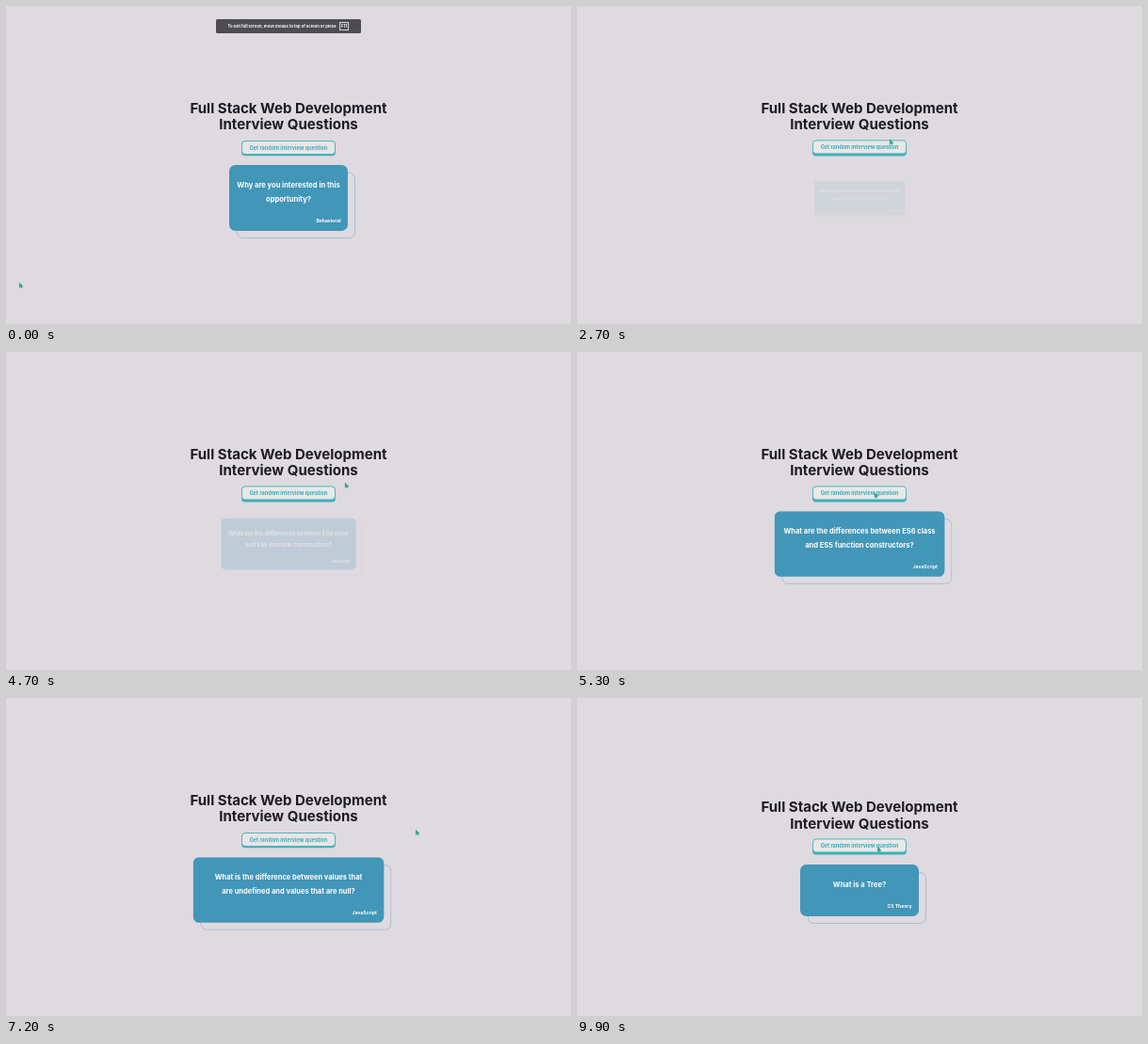
Write an HTML page that moves like this. It is 600x338 px and loops after 10 s.

```html
<!DOCTYPE html>
<html lang="en">
<head>
<meta charset="utf-8">
<title>Interview Questions</title>
<style>
  html, body { margin: 0; width: 100%; height: 100%; overflow: hidden; background: #dedadf; }
  #stage { position: relative; width: 600px; height: 338px; overflow: hidden; font-family: Inter, Roboto, sans-serif; }
  #stage * { box-sizing: border-box; }

  #notice {
    position: absolute; left: 223px; top: 14px; width: 154px; height: 15px;
    border-radius: 1.5px; background: #4d4c53; color: #fff;
    font-size: 4.2px; font-weight: 700; line-height: 15px; white-space: nowrap;
  }
  #notice span { position: absolute; left: 12.5px; }
  #notice b {
    position: absolute; left: 131px; top: 3px; width: 10px; height: 9px;
    border: .6px solid #d8d8da; line-height: 8px; text-align: center;
  }

  #head { position: absolute; left: 0; top: 0; width: 600px; text-align: center; }
  h1 {
    position: absolute; top: 99.6px; width: 600px; margin: 0;
    color: #1c1c24; font-size: 15.05px; font-weight: 700; line-height: 17.6px;
  }
  #button {
    position: absolute; left: 250px; top: 142.5px; width: 100px; height: 15.3px;
    border: 1.2px solid #4cb7bd; border-radius: 4px; background: #e8e5e5;
    box-shadow: 0 1.3px 0 #43adb5; color: #4aa9ba;
    font-size: 5.5px; font-weight: 700; line-height: 14px; white-space: nowrap;
  }
  #button.hover { transform: translateY(-.6px); background: #e9e8e8; box-shadow: 0 2.2px 0 #3faeb5; color: #38adb4; }
  #button.press { transform: translateY(1.2px); background: #ebe8e4; box-shadow: none; color: #38b0b2; }

  #card { position: absolute; }
  #outline, #face { position: absolute; width: 100%; height: 100%; border-radius: 6.5px; }
  #outline { left: 8px; top: 8px; border: 1px solid #a6c0d3; }
  #face { background: #4296b8; color: #fff; font-weight: 700; }
  #text { position: absolute; top: 13.5px; width: 100%; text-align: center; white-space: pre; font-size: 7.55px; line-height: 15px; }
  #topic { position: absolute; right: 7.5px; bottom: 7px; font-size: 5.05px; line-height: 8px; white-space: nowrap; }

  #cursor { position: absolute; left: 0; top: 0; width: 4.8px; height: 6.4px; overflow: visible; }
</style>
</head>
<body>
<div id="stage">
  <div id="notice"><span>To exit full screen, move mouse to top of screen or press</span><b>F11</b></div>
  <div id="head">
    <h1>Full Stack Web Development<br>Interview Questions</h1>
    <div id="button">Get random interview question</div>
  </div>
  <div id="card">
    <div id="outline"></div>
    <div id="face"><div id="text"></div><div id="topic"></div></div>
  </div>
  <svg id="cursor" viewBox="0 0 6 8">
    <path d="M.5 .5V6.6L2 5.4L2.9 7.2L4 6.7L3.2 5L4.6 4.5Z" fill="#22a88c" stroke="#1d8f83" stroke-width=".6"/>
  </svg>
</div>
<script>
const LOOP = 10000, GLIDE = 500, PRESS = 150;
const $ = id => document.getElementById(id);

// at: when the question pops in; rest: where the pointer waits; click: x of the press that ends it
const es6 = { width: 182, topic: 'JavaScript', text: 'What are the differences between ES6 class\nand ES5 function constructors?' };
const questions = [
  { at: -2000, rest: [14, 294], width: 126, topic: 'Behavioral', text: 'Why are you interested in this\nopportunity?' },
  { at: 1200, rest: [456, 142], width: 130, topic: 'CSS', text: 'What is CSS selector\nspecificity and how does it\nwork?' },
  { at: 2680, rest: [484, 131], ...es6 },
  { at: 4650, rest: [488, 108], ...es6 },
  { at: 5500, rest: [485, 130], click: 291, width: 182, topic: 'CSS', text: 'Have you used or implemented media\nqueries or mobile specific layouts/CSS?' },
  { at: 6550, rest: [435, 140], width: 204, topic: 'JavaScript', text: 'What is the difference between values that\nare undefined and values that are null?' },
  { at: 8235, rest: [465, 176], click: 319, width: 126, topic: 'CS Theory', text: 'What is a Tree?' }
];

questions.forEach((q, i) => {
  const rows = q.text.split('\n').length;
  q.height = 40 + 15 * rows;
  q.shift = (2 - rows) * 7.5;
  q.end = questions[i + 1]?.at ?? LOOP;
  q.press = [q.click ?? 311, 150.5 + q.shift];
  q.from = i ? questions[i - 1].press : q.rest;
});

const easing = 'cubic-bezier(.215,.61,.355,1)';
const scales = [.3, 1.1, .9, 1.03, .97, 1];
const pop = $('card').animate(scales.map(s => ({ transform: `scale(${s})`, easing })), { duration: 1000, fill: 'both' });
const fade = $('card').animate([{ opacity: 0, easing }, { opacity: 1 }], { duration: 720, fill: 'both' });
pop.pause();
fade.pause();

const clamp = u => Math.max(0, Math.min(1, u));
const easeOut = u => 1 - (1 - u) ** 3;
const smooth = u => u * u * (3 - 2 * u);
const mix = (a, b, u) => a.map((v, i) => v + (b[i] - v) * u);

// The pointer shoots away from the button, waits, then returns to press it.
function pointer(q, t) {
  const away = mix(q.from, q.rest, easeOut(clamp((t - q.at) / GLIDE)));
  return mix(away, q.press, smooth(clamp((t - q.end + PRESS) / GLIDE + 1)));
}

let shown = null;
function show(q) {
  if (q === shown) return;
  shown = q;
  Object.assign($('card').style, {
    width: q.width + 'px', height: q.height + 'px',
    left: 300 - q.width / 2 + 'px', top: 204 - q.height / 2 + 'px'
  });
  $('text').textContent = q.text;
  $('topic').textContent = q.topic;
  $('head').style.top = q.shift + 'px';
}

function draw(now) {
  const t = now % LOOP;
  const q = questions.findLast(item => item.at <= t);
  show(q);
  pop.currentTime = fade.currentTime = t - q.at;

  const [x, y] = pointer(q, t);
  $('cursor').style.transform = `translate(${x}px, ${y}px)`;

  const over = Math.abs(x - 305) < 55 && Math.abs(y - 148.5 - q.shift) < 10;
  const pressed = q.end < LOOP && t >= q.end - PRESS;
  $('button').className = pressed ? 'press' : over ? 'hover' : '';
  $('notice').style.opacity = clamp((2250 - t) / 200);
}

const start = performance.now();
function tick() {
  draw(performance.now() - start);
  requestAnimationFrame(tick);
}
tick();
</script>
</body>
</html>
```
